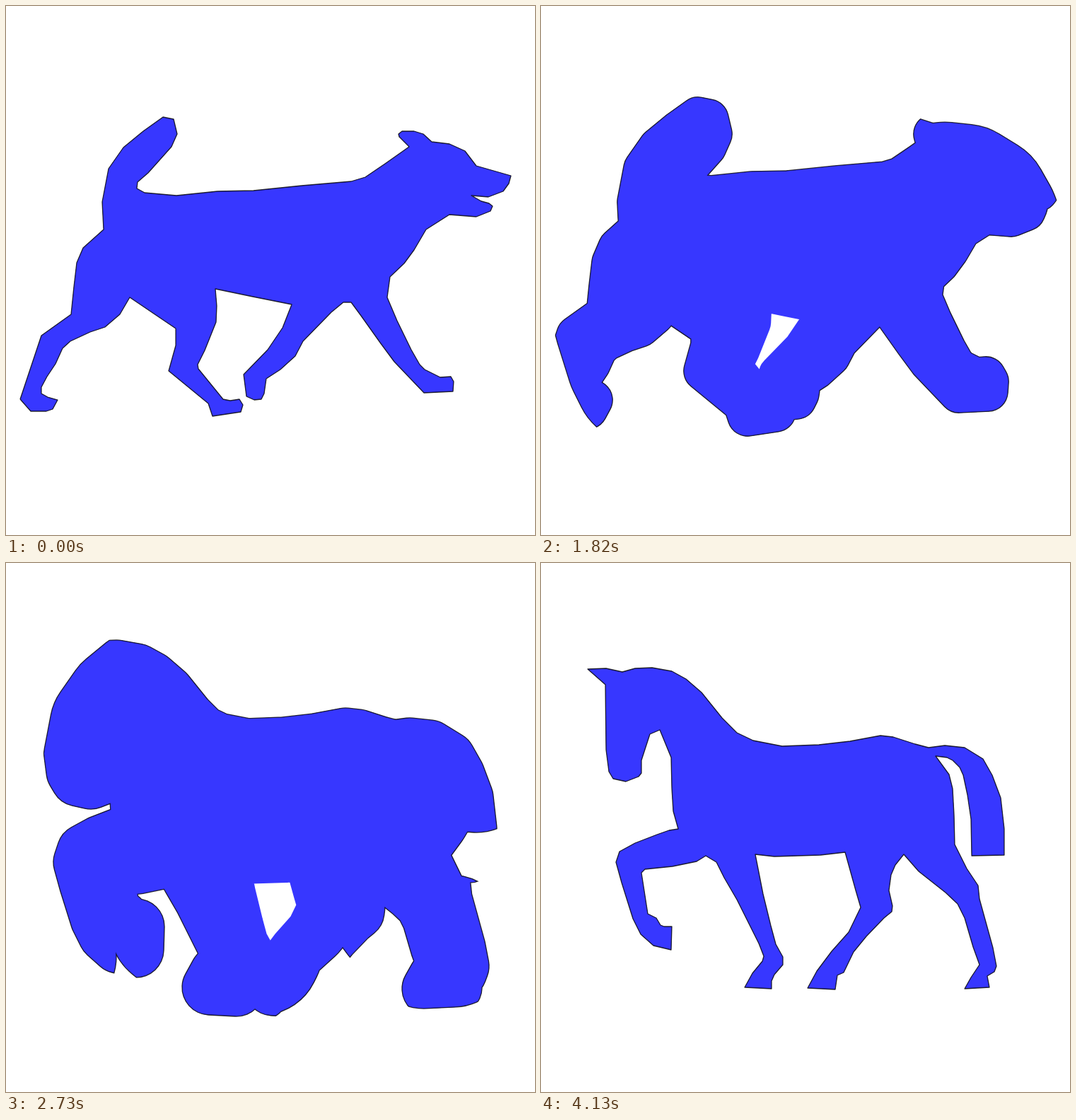
Animation of 748x748 px, one loop 4.83 s. Source, as an HTML page with a canvas:

```html
<!DOCTYPE html>
<html lang="en">
<head>
<meta charset="utf-8">
<title>Dog to horse morph</title>
<style>
  html, body { margin: 0; width: 100%; height: 100%; overflow: hidden; background: #fff; }
  canvas { display: block; width: 748px; height: 748px; }
</style>
</head>
<body>
<canvas id="stage" width="748" height="748"></canvas>
<script>
const SIZE = 748, HOLD = 700, STEP = 70, STEPS = 50;
const LOOP = 2 * HOLD + (STEPS - 1) * STEP;
const REACH = 122.1;          // Hausdorff distance between the two outlines
const HALF_LINE = 0.65;
const FILL = '#3737ff', LINE_OUT = '#333', LINE_IN = '#0b0b33';

const dog = {
  tail: '138,316 136,277 145,230 166,200 194,177 222,157 237,160 242,181 234,199 201,236 186,249 185,258 196,264',
  back: '241,268 299,262 350,261 418,254 488,248 508,242 536,223',
  head: '570,199 556,185 555,181 560,177 577,177 590,181 602,192 627,195 649,205 665,226 714,240 711,251 703,262 682,270 658,268 672,276 683,279 688,283 685,290 665,298 627,295',
  chest: '594,316 577,345 563,364 543,383 539,412',
  foreLegs: '553,445 573,486 585,507 592,514 614,525 629,524 633,531 632,545 591,547 549,503 529,476 502,438 488,419 477,419 460,433 420,474 409,495 388,514 368,527 365,548 361,556 351,557 340,552 336,521 370,486 391,455 404,422',
  hindLegs: '349,411 296,400 298,424 297,447 281,487 271,507 272,513 307,556 317,558 330,556 335,564 332,574 292,580 286,562 230,516 240,480 240,456 175,412 161,436 140,454 119,461 91,474 80,484 70,506 58,524 50,539 50,548 59,553 73,557 66,570 57,573 35,573 20,556 50,466 92,436',
  rump: '96,397 100,363 109,342'
};

const horse = {
  head: '184,275 168,236 154,242 142,279 142,297 138,302 120,309 102,305 96,295 92,264 91,172 66,150 92,149 115,154',
  back: '133,149 157,148 185,153 205,164 227,183 256,219 277,240 300,251 341,259 393,257 437,252 480,244 498,246 529,256 548,261',
  tail: '571,258 599,261 625,277 638,300 650,332 655,376 655,413 609,414 608,362 603,328 597,300 592,289 582,279 574,275 558,273',
  hindLegs: '577,299 582,319 584,356 585,398 602,432 618,456 620,475 639,544 644,570 641,578 631,584 634,600 599,602 608,586 620,568 611,543 599,502 589,482 572,466 534,436 513,412 501,427 495,441 492,463 497,485 496,493 485,502 460,528 442,550 428,579 419,583 416,603 377,601 390,577 411,549 435,522 452,487 445,463 430,409',
  foreLeg: '395,413 330,415 303,412 314,468 325,513 332,539 342,557 342,568 330,582 326,591 326,602 288,600 299,580 313,563 315,556 308,538 277,476 259,445 248,423 233,414',
  raisedLeg: '220,422 186,429 147,433 142,438 151,496 163,502 169,512 174,514 185,514 184,547 159,541 141,525 130,503 114,452 106,423 111,408 133,396 164,384 181,378 194,376',
  chest: '187,351 185,319'
};

const outline = parts => new Path2D('M' + Object.values(parts).join(' ') + 'Z');
const context = canvas => canvas.getContext('2d', { willReadFrequently: true });

function layer() {
  const canvas = document.createElement('canvas');
  canvas.width = canvas.height = SIZE;
  return context(canvas);
}

const dogPath = outline(dog), horsePath = outline(horse);
const view = context(document.getElementById('stage'));
const layerA = layer(), layerB = layer();

// Fills a path grown (or shrunk, if negative) by a distance.
function grow(ctx, path, distance) {
  ctx.globalCompositeOperation = 'source-over';
  ctx.clearRect(0, 0, SIZE, SIZE);
  ctx.fill(path);
  if (distance < 0) ctx.globalCompositeOperation = 'destination-out';
  if (distance === 0) return;
  ctx.lineJoin = 'round';
  ctx.lineWidth = 2 * Math.abs(distance);
  ctx.stroke(path);
}

// Paints the overlap of the grown dog and the grown horse.
function overlap(radius, extra, color) {
  grow(layerA, dogPath, radius + extra);
  grow(layerB, horsePath, REACH - radius + extra);
  layerA.globalCompositeOperation = 'destination-in';
  layerA.drawImage(layerB.canvas, 0, 0);
  layerA.globalCompositeOperation = 'source-in';
  layerA.fillStyle = color;
  layerA.fillRect(0, 0, SIZE, SIZE);
  view.drawImage(layerA.canvas, 0, 0);
}

// Lists white pixels that cannot be reached from the stage corner.
function findHoles(pixels) {
  const open = new Uint8Array(SIZE * SIZE);
  for (let i = 0; i < open.length; i++) open[i] = pixels[i * 4] > 120 ? 1 : 0;
  const stack = [0];
  open[0] = 0;
  const visit = i => { if (open[i]) { open[i] = 0; stack.push(i); } };
  while (stack.length) {
    const i = stack.pop(), x = i % SIZE;
    if (x > 0) visit(i - 1);
    if (x < SIZE - 1) visit(i + 1);
    if (i >= SIZE) visit(i - SIZE);
    if (i < SIZE * (SIZE - 1)) visit(i + SIZE);
  }
  const holes = [];
  open.forEach((on, i) => { if (on) holes.push(i); });
  return holes;
}

// Holes carry no outline: restore the plain pixels around them.
function clearHoleEdges(holes, plain) {
  const image = view.getImageData(0, 0, SIZE, SIZE);
  const from = new Uint32Array(plain.buffer), to = new Uint32Array(image.data.buffer);
  for (const i of holes)
    for (let dy = -2; dy <= 2; dy++)
      for (let dx = -2; dx <= 2; dx++) {
        const k = i + dy * SIZE + dx;
        to[k] = from[k];
      }
  view.putImageData(image, 0, 0);
}

const ease = t => t < 0.5 ? 2 * t * t : 1 - 2 * (1 - t) * (1 - t);

function draw(step) {
  const radius = REACH * ease(step / STEPS);
  view.fillStyle = '#fff';
  view.fillRect(0, 0, SIZE, SIZE);
  overlap(radius, 0, FILL);
  const plain = view.getImageData(0, 0, SIZE, SIZE).data;
  const holes = findHoles(plain);
  overlap(radius, HALF_LINE, LINE_OUT);
  overlap(radius, 0, LINE_IN);
  overlap(radius, -HALF_LINE, FILL);
  if (holes.length) clearHoleEdges(holes, plain);
}

const start = performance.now();
let shown = -1;

function tick() {
  const time = (performance.now() - start) % LOOP;
  const step = time < HOLD ? 0 : Math.min(STEPS, 1 + Math.floor((time - HOLD) / STEP));
  if (step !== shown) draw(shown = step);
  requestAnimationFrame(tick);
}
tick();
</script>
</body>
</html>
```
